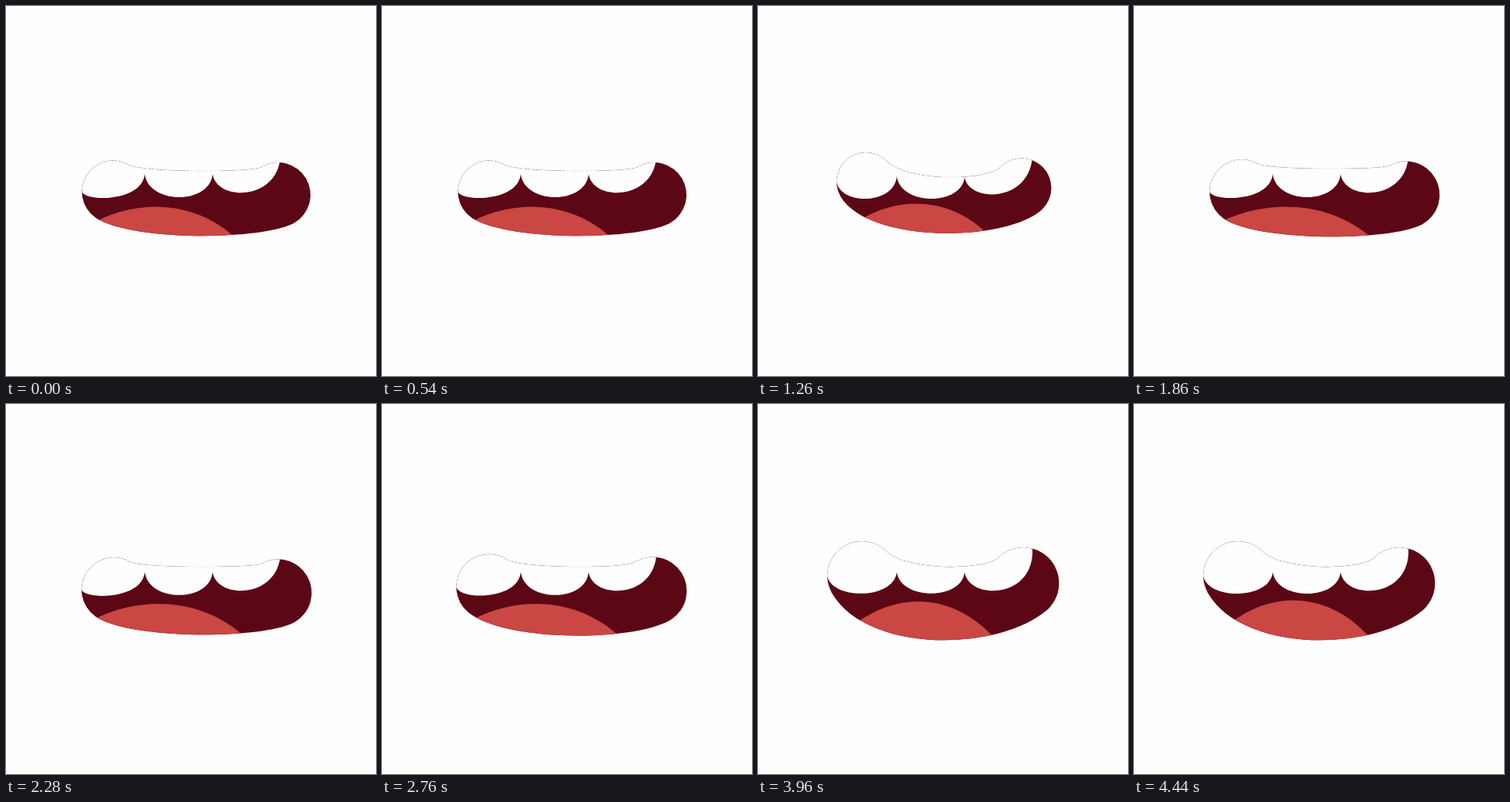
These frames come from a looping animation (480 by 480 pixels, 4.5 s). An HTML page with a canvas:

```html
<!DOCTYPE html>
<html lang="en">
<head>
<meta charset="utf-8">
<title>Talking mouth</title>
<style>
html, body { margin: 0; width: 100%; height: 100%; overflow: hidden; background: #fefefe; }
canvas { display: block; width: 100vw; height: 100vh; }
</style>
</head>
<body>
<canvas id="stage" width="480" height="480"></canvas>
<script>
const ctx = document.getElementById('stage').getContext('2d');
const LOOP = 4500, STEP = 60;
const DARK = '#5c0715', RED = '#ca4743', WHITE = '#fefefe';

// l, r: round corners of the mouth; sag, floor: middle of upper and lower lip;
// a, b, c: gaps between teeth and the last tooth's end; bite: tooth length;
// t0, t1, peak: tongue from left to right and its height; curl: 0 flat, 1 smiling
const wide = {
  lx: 139, ly: 241, lr: 40.5, rx: 353, ry: 245, rr: 42, sag: 214, floor: 298, curl: 0,
  ax: 180, ay: 218, bx: 268, by: 218, cx: 356, cy: 195, bite: 248,
  t0: 121, t1: 292, peak: 261
};
const small = {
  lx: 187, ly: 232, lr: 15.5, rx: 334, ry: 238, rr: 15.5, sag: 238.5, floor: 270, curl: 1,
  ax: 193, ay: 220, bx: 280, by: 228, cx: 350, cy: 252, bite: 250,
  t0: 196, t1: 274, peak: 255
};
const smile = {
  ...wide, lx: 140, ly: 228, lr: 38, rx: 342, ry: 236, rr: 38.5, sag: 222, floor: 294.5, curl: 1,
  ay: 221, by: 222, bite: 250, t0: 136, t1: 294, peak: 257
};
const broad = { ...wide, lx: 140, lr: 42, rr: 43.5, sag: 211, floor: 299, t0: 119, t1: 304 };
const grin = {
  ...broad, lx: 135, ly: 223, lr: 45, rx: 344, ry: 232.5, rr: 46.5, floor: 306, curl: 1,
  bite: 247, t0: 132, t1: 307
};
const grinEnd = { ...grin, bite: 246, t0: 125, peak: 255 };

const linear = p => p, easeIn = p => p ** 4, easeOut = p => 1 - (1 - p) ** 2;

// time, pose, easing on the way there, swell on the way there
const keys = [
  [0, wide], [540, wide], [660, small], [840, small], [1260, smile, easeOut], [1320, smile],
  [1860, broad, linear, 1], [2400, broad], [2940, grin, easeIn], [3480, grin], [4440, grinEnd]
];

function poseAt(t) {
  const k = Math.max(1, keys.findIndex(key => t <= key[0]));
  const [t0, from] = keys[k - 1], [t1, to, ease = linear, swell = 0] = keys[k];
  const p = (t - t0) / (t1 - t0), u = ease(p), bump = Math.sin(Math.PI * p);
  const pose = {};
  for (const name in from) pose[name] = from[name] + (to[name] - from[name]) * u;
  pose.peak += 2 * bump * Math.sin(t / 95);
  pose.t0 += 2 * bump * Math.cos(t / 95);
  pose.bite += bump * Math.sin(t / 80);
  pose.swell = swell * bump;
  return pose;
}

const rad = deg => deg * Math.PI / 180;

// Height of the two controls that makes a cubic pass through mid at its middle
const controlY = (y0, y1, mid) => (mid - (y0 + y1) / 8) / 0.75;

// Point on a corner's circle
const onArc = (x, y, r, deg) => [x + r * Math.cos(rad(deg)), y + r * Math.sin(rad(deg))];

// Joins two circle points tangentially, passing the height mid halfway
function lip([x0, y0], deg0, [x1, y1], deg1, mid) {
  const y = controlY(y0, y1, mid);
  const along = (from, deg) => -(y - from) * Math.tan(rad(deg));
  ctx.bezierCurveTo(x0 + along(y0, deg0), y, x1 + along(y1, deg1), y, x1, y1);
}

function lipPath(m) {
  const top = 60 - 15 * m.curl, lowL = 125 + 25 * m.curl, lowR = 65 - 15 * m.curl;
  const left = deg => onArc(m.lx, m.ly, m.lr, deg);
  const right = deg => onArc(m.rx, m.ry, m.rr, deg);
  ctx.beginPath();
  ctx.arc(m.lx, m.ly, m.lr, rad(lowL), rad(360 - top));
  lip(left(-top), -top, right(top - 180), top - 180, m.sag);
  ctx.arc(m.rx, m.ry, m.rr, rad(top - 180), rad(lowR));
  lip(right(lowR), lowR, left(lowL), lowL, m.floor);
  ctx.closePath();
}

function drawTongue(m) {
  const w = m.t1 - m.t0, y0 = m.floor - 0.12 * w, y1 = m.floor - 2;
  const y = controlY(y0, y1, m.peak);
  ctx.beginPath();
  ctx.moveTo(m.t0, y0);
  ctx.bezierCurveTo(m.t0 + 0.3 * w, y, m.t0 + 0.7 * w, y, m.t1, y1);
  ctx.lineTo(m.t1 + 10, 330);
  ctx.lineTo(m.t0 - 20, 330);
  ctx.fillStyle = RED;
  ctx.fill();
}

function drawTeeth(m) {
  const gaps = [[m.lx - m.lr, m.ly], [m.ax, m.ay], [m.bx, m.by], [m.cx, m.cy]];
  ctx.beginPath();
  ctx.moveTo(60, m.ly);
  ctx.lineTo(...gaps[0]);
  for (let i = 0; i < 3; i++) {
    const [x0, y0] = gaps[i], [x1, y1] = gaps[i + 1], w = x1 - x0;
    const tip = Math.min(m.bite, (y0 + y1) / 2 + 0.4 * w);
    const y = controlY(y0, y1, tip);
    ctx.bezierCurveTo(x0 + 0.06 * w, y, x1 - 0.04 * w, y, x1, y1);
  }
  ctx.lineTo(m.cx, 120);
  ctx.lineTo(60, 120);
  ctx.fillStyle = WHITE;
  ctx.fill();
}

function drawMouth(m) {
  ctx.save();
  ctx.translate(247.5, 249);
  ctx.scale(1 + 0.05 * m.swell, 1 + 0.12 * m.swell);
  ctx.translate(-247.5, -249);
  ctx.save();
  lipPath(m);
  ctx.clip();
  ctx.fillStyle = DARK;
  ctx.fillRect(0, 0, 480, 480);
  drawTongue(m);
  drawTeeth(m);
  ctx.restore();
  lipPath(m);
  ctx.setLineDash([2, 3]);
  ctx.lineWidth = 0.5;
  ctx.strokeStyle = 'rgba(60, 10, 25, 0.35)';
  ctx.stroke();
  ctx.restore();
}

function draw(time) {
  const t = Math.floor(time / STEP) * STEP;
  ctx.fillStyle = WHITE;
  ctx.fillRect(0, 0, 480, 480);
  const shut = t >= 660 && t < 840;
  if (!shut) drawMouth(poseAt(t));
}

const start = performance.now();
function frame() {
  draw((performance.now() - start) % LOOP);
  requestAnimationFrame(frame);
}
frame();
</script>
</body>
</html>
```
